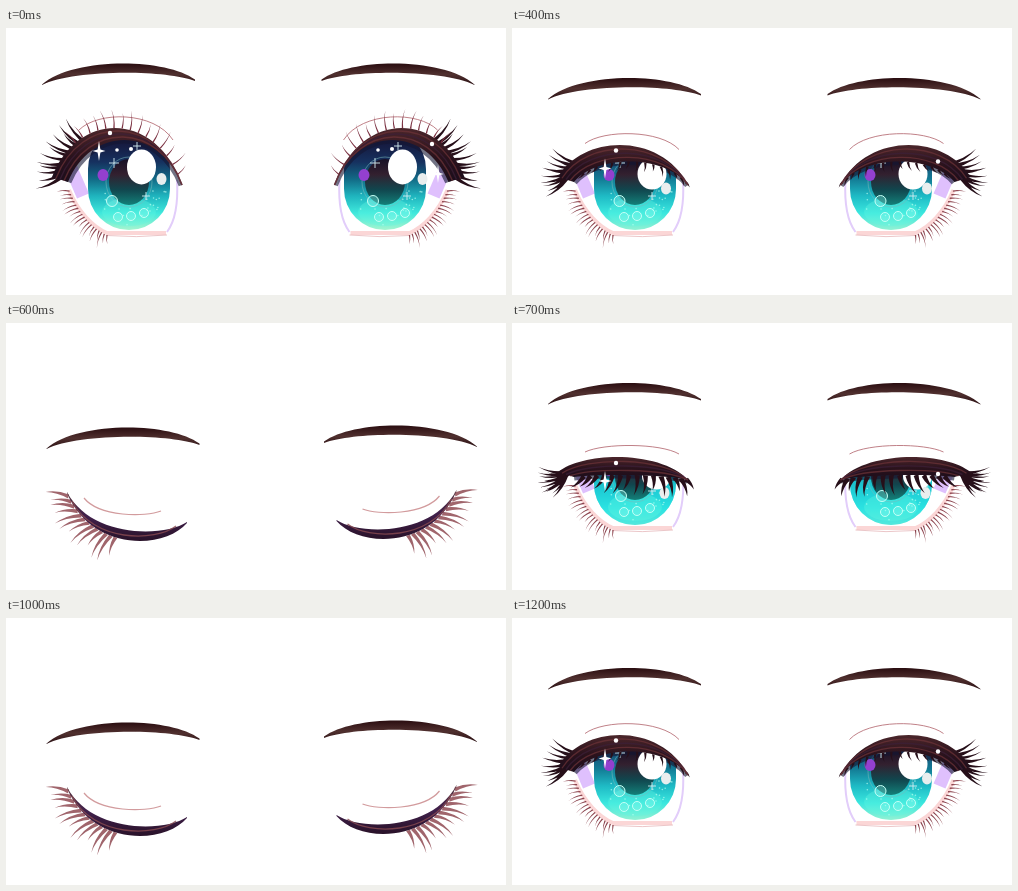
Animation, 500 px wide and 267 px high, one loop 1300 ms. Source, as an HTML page:

```html
<!DOCTYPE html>
<html lang="en">
<head>
<meta charset="utf-8">
<title>Blinking eyes</title>
<style>
html, body { margin: 0; width: 100%; height: 100%; overflow: hidden; background: #fff; }
svg { display: block; width: 100vw; height: 100vh; }
</style>
</head>
<body>
<svg id="stage" viewBox="0 0 500 267"></svg>
<script>
const STEP = 100, STEPS = 13, OPEN_STEPS = 4;
const IRIS_SHIFT = 256, LIGHT_SHIFT = 261, MIRROR = 504.5, CLOSED_MIRROR = 511.5;

const lerp = (a, b, t) => a + (b - a) * t;

function seededRandom(seed) {
  return () => (seed = (seed * 16807) % 2147483647) / 2147483647;
}

// Curves are four Bezier points; an arc is given by its ends and the height of its middle.
function arc(x0, y0, x1, y1, middle) {
  const handle = (8 * middle - y0 - y1) / 6, w = x1 - x0;
  return [[x0, y0], [x0 + w * .2, handle], [x1 - w * .2, handle], [x1, y1]];
}
const curve = c => `M${c[0]}C${c[1]} ${c[2]} ${c[3]}`;
const band = (a, b) => `${curve(a)}L${b[3]}C${b[2]} ${b[1]} ${b[0]}Z`;
const pointOn = (c, t) => [0, 1].map(k => {
  const s = 1 - t;
  return s * s * s * c[0][k] + 3 * s * s * t * c[1][k] + 3 * s * t * t * c[2][k] + t * t * t * c[3][k];
});

const fill = (d, color) => `<path d="${d}" fill="${color}"/>`;
const stroke = (d, color, width, opacity = 1) =>
  `<path d="${d}" fill="none" stroke="${color}" stroke-width="${width}" opacity="${opacity}" stroke-linejoin="round"/>`;
const oval = (x, y, rx, ry, color, extra = '') =>
  `<ellipse cx="${x}" cy="${y}" rx="${rx}" ry="${ry}" fill="${color}" ${extra}/>`;
const dot = (x, y, r) => oval(x, y, r, r, '#fff');
const ring = (x, y, r) => oval(x, y, r, r, '#8ff8ee', 'fill-opacity=".3" stroke="#c4fff6"');
const cross = (x, y, r) => stroke(`M${x - r},${y}h${2 * r}M${x},${y - r}v${2 * r}`, '#d5eef2', .9);
const star = (x, y, r) => {
  const k = r * .14;
  return fill(`M${x},${y - r}l${k},${r - k}l${r * .5},${k}l${-r * .5},${k}l${-k},${r - k}` +
    `l${-k},${k - r}l${-r * .5},${-k}l${r * .5},${-k}Z`, '#fff');
};
const shift = (dx, dy, body) => `<g transform="translate(${dx} ${dy})">${body}</g>`;
const clipped = (id, body) => `<g clip-path="url(#${id})">${body}</g>`;
const flip = (sum, body, dy = 0) => `<g transform="matrix(-1 0 0 1 ${sum} ${dy})">${body}</g>`;
const gradient = (id, ...colors) =>
  `<linearGradient id="${id}" x1="0" y1="0" x2="0" y2="1">${colors.map((c, i) =>
    `<stop offset="${i / (colors.length - 1)}" stop-color="${c}"/>`).join('')}</linearGradient>`;

// Tapered hair from (x, y), bowed sideways by `bend`; angles in degrees, clockwise from the right.
function hair([x, y], angle, length, width, bend) {
  const a = angle * Math.PI / 180, cos = Math.cos(a), sin = Math.sin(a);
  const at = (along, off) => `${(x + cos * along - sin * off).toFixed(1)},${(y + sin * along + cos * off).toFixed(1)}`;
  const mid = length * .55, bow = length * bend;
  return `M${at(0, width)}Q${at(mid, bow + width / 2)} ${at(length, 0)}` +
    `Q${at(mid, bow - width / 2)} ${at(0, -width)}Z`;
}

// Row of hairs along a curve, turning evenly from one angle to another.
function lashes(base, { count, from = 0, to = 1, angles, length, width = 1, bend = -.15, seed = 7 }) {
  const random = seededRandom(seed * 7919);
  return Array.from({ length: count }, (_, i) => {
    const u = i / (count - 1), jitter = random() - .5;
    return hair(pointOn(base, lerp(from, to, u)), lerp(...angles, u) + jitter * 16,
      length * (.7 + .6 * random()), width, bend);
  }).join('');
}

const brow = dy => shift(0, dy, fill(band(arc(36, 56.5, 189, 51.5, 35.5), arc(36, 57, 189, 53, 44.8)), 'url(#brow)'));
const lowerLid = [[61, 156], [69, 180], [84, 200], [101, 207]];

function lowerLidArt() {
  return stroke('M63,162C72,184 87,199 101,205L160,205', '#fbd6d6', 4) +
    stroke('M101,207.5Q130,210 161,207', '#e3aeb0', .7) +
    stroke('M161,204Q173,188 171,152', '#e2cdfa', 2) +
    fill(lashes(lowerLid, { count: 18, from: .1, to: 1, angles: [178, 92], length: 13, width: .7, bend: .13 }), '#8d4650');
}

function irisArt(lift) {
  const random = seededRandom(4211);
  const specks = Array.from({ length: 22 }, () => {
    const a = random() * Math.PI, r = 20 + 17 * random();
    return oval(123 + r * Math.cos(a), 160 + r * Math.sin(a), .8, .8, '#b9fff2', 'opacity=".7"');
  }).join('');
  const body = (color, extra = '') => `<rect x="82" y="100" width="82" height="102" rx="41" fill="${color}" ${extra}/>`;
  return body('url(#iris)') + body('#1fdfe6', `opacity="${.6 * (1 - lift) ** 2}"`) +
    oval(123, 184, 27, 14, '#5ff5df', 'opacity=".35"') + oval(123, 154, 20, 23, 'url(#pupil)') +
    oval(123, 154, 23, 25, 'none', 'stroke="#79b8bb" stroke-width=".9" opacity=".6"') + specks;
}

function highlights(lift) {
  const drop = 1 - lift;
  return oval(97, 147, 5.5, 6, '#9440cf') + oval(135.5 + 9 * drop, 139 + 14 * drop, 14.5, 17.5 - 4 * drop, '#fff') +
    oval(155.5 - 3 * drop, 151 + 19 * drop, 5, 6, '#e9eeee') + ring(106 + 3 * drop, 173, 5.5) +
    [0, 1, 2].map(i => ring(112 + 13 * i, 189 - i * i, 4.5)).join('') +
    cross(108, 135, 5) + cross(131, 118, 4) + cross(140, 168, 4) + dot(111, 122, 1.8) + dot(125, 121, 2);
}

// `lift` runs from 0 (half shut) to 1 (wide open).
function openEyes(lift, twinkle) {
  const apex = lerp(134, 100, lift), thick = 18 - 6 * lift * lift;
  const lidArc = (depth, left = 46 + 16 * depth) => arc(left, 149 + 5 * depth, 176, 157, apex + thick * depth);
  const outer = lidArc(0), inner = lidArc(1), middle = lidArc(.5);
  const crease = arc(73, lerp(129, 102, lift), 167, lerp(131, 112, lift), lerp(122.5, 89, lift));
  const outline = `${curve(middle)}C174,180 171,196 161,206L101,207C84,199 70,180 61,156Z`;
  const clip = `<path d="${outline}"/>`;

  const white = fill(outline, '#fff') + clipped('left', stroke('M64,138L77,168', '#dfc0fd', 13)) + lowerLidArt();
  const shade = stroke(curve(inner), '#141632', 7, .6);
  const streaks = [.25, .5, .75].map((depth, i) =>
    stroke(curve(lidArc(depth)), i % 2 ? '#3c2038' : '#6e3438', 1.4, .7)).join('');
  const outerLashes = lashes(middle, {
    count: 12, from: .01, to: .06 + .2 * lift, angles: [lerp(122, 158, lift), lerp(186, 226, lift)],
    length: 27, width: 2.1
  });
  const hanging = lashes(inner, { count: 15, from: .12, to: .97, angles: [140, 58], length: 17 * (1 - lift), width: 2.6 * (1 - lift) });
  const fringe = lift > .5 ? lashes(outer, { count: 15, from: .22, to: .95, angles: [226, 318], length: 16, width: .7, bend: .12 }) : '';
  const lid = fill(outerLashes + hanging, '#260f19') + fill(band(outer, inner), 'url(#lid)') + streaks +
    stroke(curve(crease), '#b0616a', .8) + fill(fringe, '#7a3040') + brow(24.5 * (1 - lift ** 1.3));

  return `<clipPath id="left">${clip}</clipPath><clipPath id="right">${flip(MIRROR, clip).replace('<g', '<path').replace('>' + clip + '</g>', ` d="${outline}"/>`)}</clipPath>` +
    white + flip(MIRROR, white) +
    clipped('left', irisArt(lift) + shade + highlights(lift)) +
    clipped('right', shift(IRIS_SHIFT, 0, irisArt(lift)) + flip(MIRROR, shade) + shift(LIGHT_SHIFT, 0, highlights(lift))) +
    lid + flip(MIRROR, lid) +
    shift(0, 35 * (1 - lift), star(93, 123, 10) + dot(104, 105, 2.2) + dot(426, 116, 2.2) + star(432, 146, 9 * twinkle));
}

function closedEyes() {
  const upper = arc(61, 169, 181, 199, 207), lower = arc(61, 170, 181, 200, 217);
  const hairs = lashes(lower, { count: 13, from: .02, to: .42, angles: [192, 108], length: 23, width: 2, bend: .14 });
  const side = shift(4.5, 0, brow(69)) + fill(hairs, '#a0656c') + fill(band(upper, lower), 'url(#closedLid)') +
    stroke(curve(arc(66, 178, 170, 203, 212)), '#8a4b52', 1.3, .8) +
    stroke(curve(arc(78, 175, 155, 188, 191)), '#d29b9d', 1.2);
  return side + flip(CLOSED_MIRROR, side, -2);
}

const defs = '<defs>' +
  gradient('iris', '#120b22', '#161c42', '#16315f', '#126a86', '#1fb4be', '#3fe8dc', '#a6f5cf') +
  gradient('pupil', '#171025', '#33202f', '#11464e', '#138079') +
  gradient('lid', '#4b262b', '#2a121c', '#1a0d1b') +
  gradient('closedLid', '#54323c', '#40204b', '#291229') +
  gradient('brow', '#2a0d10', '#50302f', '#2a1013') + '</defs>';
const stage = document.getElementById('stage');
let shown = -1;

function render(time) {
  const step = Math.floor(time / STEP) % STEPS;
  if (step === shown) return;
  shown = step;
  const blink = (step - OPEN_STEPS) % 4;
  const open = step < OPEN_STEPS;
  const lift = open ? 1 : blink === 0 ? .5 : 0;
  const twinkle = open ? 1 - step / (OPEN_STEPS - 1) : 0;
  stage.innerHTML = defs + (!open && blink === 2 ? closedEyes() : openEyes(lift, twinkle));
}

const start = performance.now();
function tick() {
  render(performance.now() - start);
  requestAnimationFrame(tick);
}
tick();
</script>
</body>
</html>
```
